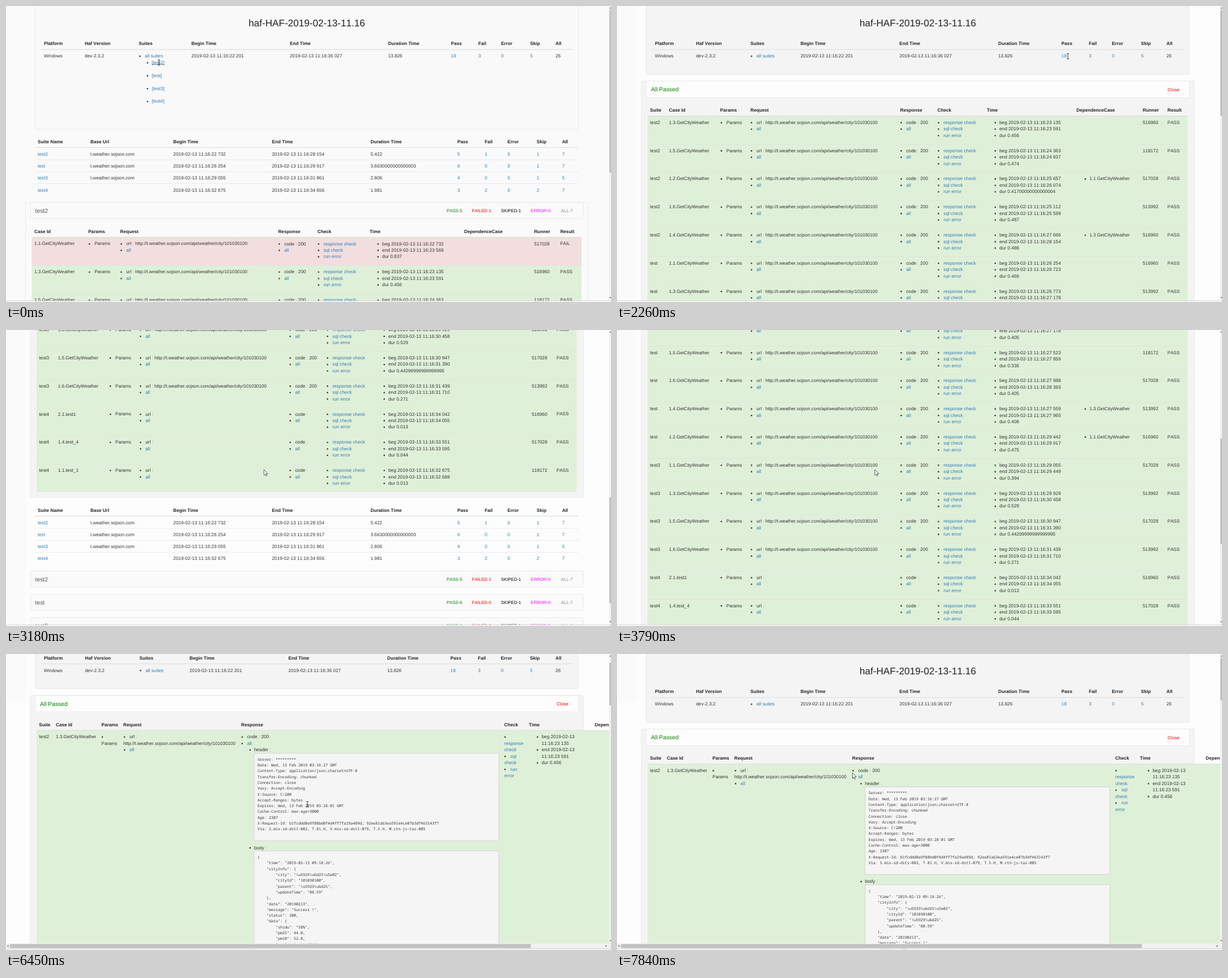
Write an HTML page that moves like this. It is 1068x524 px and loops after 7.99 s.

```html
<!DOCTYPE html>
<html lang="en">
<head>
<meta charset="utf-8">
<title>Test report</title>
<style>
html, body { margin: 0; width: 100%; height: 100%; overflow: hidden; background: #fdfdfd; }
svg { display: block; width: 1068px; height: 524px; }
text { font-family: "Liberation Sans", Arial, sans-serif; font-kerning: none; white-space: pre; text-rendering: geometricPrecision; }
.mono { font-family: "Noto Sans Mono", "DejaVu Sans Mono", monospace; }
</style>
</head>
<body>
<svg id="stage" viewBox="0 0 1068 524" xmlns="http://www.w3.org/2000/svg"></svg>
<script>
const LOOP = 7990, DAY = '2019-02-13 ';
const INK = '#333', LINK = '#337ab7', GREEN = '#dff0d8', PINK = '#f2dede', BORDER = '#e6e6e6';
const HEADING = 10.3, LINE = 11.45, ROW = 49.78;

// --- drawing helpers; y is the middle of the capitals ---
const bodySize = s => /[A-Z]|\/\//.test(s) ? 8.1 : 8.24;
const text = (x, y, s, fill = INK, size = bodySize(s), extra = '') =>
  `<text x="${x}" y="${(y + size * .355).toFixed(2)}" font-size="${size}" fill="${fill}" ${extra}>` +
  String(s).replace(' :', '<tspan fill="#888"> :</tspan>') + '</text>';
const bold = (x, y, s) => text(x, y, s, '#222', 8.18, 'font-weight="700"');
const link = (x, y, s) => text(x, y, s, LINK);
const dot = (x, y) => `<circle cx="${x}" cy="${y + .6}" r="1.3" fill="${INK}"/>`;
const item = (x, y, s, fill, gap = 8.8) => dot(x - gap, y) + text(x, y, s, fill);
const rect = (x, y, x2, y2, fill, stroke) =>
  `<rect x="${x}" y="${y}" width="${x2 - x}" height="${y2 - y}" fill="${fill}"` +
  (stroke ? ` stroke="${stroke}" stroke-width=".8" rx="2"/>` : '/>');
const rule = (x, x2, y, w = .6) => rect(x, y - w / 2, x2, y + w / 2, '#ddd');
const heads = (names, xs, y) => names.split(', ').map((n, i) => bold(xs[i], y, n)).join('');
const stretch = (xs, from, to, k) => xs.map(x => to + (x - from) * k);
const stamp = seconds => DAY + '11:16:' + seconds.toFixed(3).replace('.', ' ');

// --- summary box at the top ---
const TOP = [67, 139.5, 235.5, 324, 498.6, 673, 784.6, 833, 873.4, 925, 970];
const SUITE_NAMES = ['test2', 'test', 'test3', 'test4'];
function summary(wide, open, fill = '#f4f4f4') {
  // the open suite list widens its column and squeezes those after it
  const base = open ? TOP.map((x, i) => i < 3 ? x - i * .6 : x + 3.3 * (970 - x) / 646) : TOP;
  const xs = wide ? stretch(base, 62, 62, 1.0096) : base;
  let out = rect(51.5, -6, wide ? 1020 : 1010.5, open ? 218 : 121, fill, BORDER) +
    text(wide ? 535.7 : 531, 29.5, 'haf-HAF-2019-02-13-11.16', '#222', 17.12, 'text-anchor="middle"') +
    heads('Platform, Haf Version, Suites, Begin Time, End Time, Duration Time, Pass, Fail, Error, Skip, All', xs, 66.5) +
    rule(62, wide ? 1008 : 999, 77, 1.1) + item(xs[2] + 10.7, 88.3, 'all suites', LINK);
  const cells = ['Windows', 'dev-2.3.2', '', stamp(22.201), stamp(36.027), '13.826', 18, 3, 0, 5, 26];
  cells.forEach((s, i) => out += text(xs[i], 88.3, s, i > 5 && i < 10 ? LINK : INK));
  if (open) SUITE_NAMES.forEach((n, i) => out += item(xs[2] + 23, 100 + i * 22.8, `[${n}]`, LINK, 7.5));
  return out;
}

// --- suites: begin, duration, then passed, failed, errors, skipped ---
const SUITES = ['22.732 5.422 5 1 0 1', '26.254 3.6630000000000003 6 0 0 1',
  '29.055 2.806 4 0 0 1', '32.675 1.981 3 2 0 2'].map((line, i) => {
  const [beg, dur, ...counts] = line.split(' ');
  return { name: SUITE_NAMES[i], beg: +beg, dur, counts: [...counts, counts.reduce((a, b) => a + +b, 0)] };
});
const SUITE_COLS = [56, 149, 295.3, 469.5, 643.5, 796.8, 845, 885.2, 936.7, 981.7];
function suiteTable(wide, dy) {
  const xs = wide ? stretch(SUITE_COLS, 51.5, 51.5, 1.01) : SUITE_COLS, right = wide ? 1020 : 1010.5;
  let out = rule(51.5, right, 153.5 + dy, 1.1) +
    heads('Suite Name, Base Url, Begin Time, End Time, Duration Time, Pass, Fail, Error, Skip, All', xs, 143.3 + dy);
  SUITES.forEach(({ name, beg, dur, counts }, i) => {
    const y = 165 + dy + i * 21.2;
    const cells = [name, i < 3 ? 't.weather.sojson.com' : '', stamp(beg), stamp(beg + +dur), dur, ...counts];
    cells.forEach((s, k) => out += text(xs[k], y, s, k && k < 5 ? INK : LINK));
    if (i < 3) out += rule(51.5, right, y + 10.2);
  });
  return out;
}

// --- collapsed suite panels ---
function panelHead(i, wide, y) {
  const { name, counts: [pass, fail, error, skip, all] } = SUITES[i], dx = wide ? 0 : -9.2;
  const tag = (x, label, color) => text(x + dx, y + 14.4, label, color, 7.78);
  return rect(43, y, wide ? 1028 : 1019.3, y + 28.6, wide ? '#fcfcfc' : '#fafafa', BORDER) +
    text(51.6, y + 14.4, name, '#555', HEADING) +
    tag(787, 'PASS-' + pass, 'green') + tag(831.7, 'FAILED-' + fail, 'red') +
    tag(883, 'SKIPED-' + skip, '#000') + tag(935.5, 'ERROR-' + error, '#f0f') + tag(989, 'ALL-' + all, '#888');
}
const panels = (wide, dy) => SUITES.map((_, i) => panelHead(i, wide, 250.6 + dy + i * 41.2)).join('');

// --- test cases: id, begin, duration, runner ---
const RUNNERS = { a: 516960, b: 517028, c: 513992, d: 118172 };
const PASSED = [
  '1.3 23.135 0.456 a, 1.5 24.363 0.474 d, 1.2 25.657 0.41700000000000004 b, 1.6 25.112 0.487 c, 1.4 27.666 0.488 a',
  '1.1 26.254 0.469 a, 1.3 26.773 0.405 c, 1.5 27.523 0.336 d, 1.6 27.988 0.405 b, 1.4 27.559 0.406 c, 1.2 29.442 0.475 a',
  '1.1 29.055 0.394 b, 1.3 29.929 0.529 c, 1.5 30.947 0.44299999999999995 b, 1.6 31.439 0.271 c',
  '2.1.test1 34.042 0.013 a, 1.4.test_4 33.551 0.044 b, 1.1.test_1 32.675 0.013 d',
].flatMap((list, i) => list.split(', ').map(c => SUITE_NAMES[i] + ' ' + c));
const FAILED = 'test2 1.1 22.732 0.837 b';
const DEPENDS = { 1.2: '1.1', 1.4: '1.3' };
const URL_TEXT = 'http://t.weather.sojson.com/api/weather/city/101030100';
const CASE_HEADS = 'Case Id, Params, Request, Response, Check, Time, DependenceCase, Runner, Result';
const CASE_COLS = [91.8, 182, 235.5, 499.8, 565.5, 653, 811, 928, 971.8];
const caseName = id => id.length > 3 ? id : id + '.GetCityWeather';
function caseRow(line, xs, y, x1, x2, fill, showSuite) {
  const [suite, id, beg, dur, runner] = line.split(' '), weather = id.length === 3;
  const [name, params, req, resp, check, time, depend, run, result] = xs;
  const lines = (x, list, fill, gap) => list.map((s, i) => item(x, y + 11.2 + i * LINE, s, fill, gap)).join('');
  const cell = (x, s) => text(x, y + 11.2, s);
  const all = x => item(x + 10.7, y + 11.2 + LINE, 'all', LINK);
  return rect(x1, y, x2, y + ROW + .2, fill) + rule(x1, x2, y) +
    (showSuite ? cell(58.3, suite) : '') + cell(name, caseName(id)) + lines(params + 11, ['Params']) +
    lines(req + 10.7, ['url : ' + (weather ? URL_TEXT : '')]) + all(req) +
    lines(resp + 10.7, ['code : ' + (weather ? 200 : '')]) + all(resp) +
    lines(check + 10.8, ['response check', 'sql check', 'run error'], LINK) +
    lines(time + 22, ['beg ' + stamp(+beg), 'end ' + stamp(+beg + +dur), 'dur ' + dur], INK, 7.3) +
    (DEPENDS[id] ? lines(depend + 23, [caseName(DEPENDS[id])], INK, 7.3) : '') +
    cell(run, RUNNERS[runner]) + cell(result, fill === PINK ? 'FAIL' : 'PASS');
}

// --- scenes ---
function suiteOpen() {
  const xs = stretch(CASE_COLS, 91.8, 50, 1.055);
  return summary(false, true, '#f9f9f9') + suiteTable(false, 97) +
    rect(34.5, 347.8, 1028, 900, '#fafafa', BORDER) + panelHead(0, false, 347.8) + heads(CASE_HEADS, xs, 399) +
    [FAILED, ...PASSED.slice(0, 2)].map((r, i) =>
      caseRow(r, xs, 409.4 + i * ROW, 45.5, 1016, i ? GREEN : PINK)).join('') + rule(45.5, 1016, 409.4, 1.1);
}

const allSuites = open => summary(true, open) + suiteTable(true, open ? 97 : 0) + panels(true, open ? 97 : 0);

const passedFrame = bottom => summary(false, false) +
  rect(43, 133, 1019.3, bottom, '#f4f4f4', BORDER) + rect(51.5, 133, 1010.5, 162, '#fdfdfd', BORDER) +
  text(60, 147.6, 'All Passed', 'green', HEADING) + text(972, 147.8, 'Close', 'red') + bold(58.3, 184.4, 'Suite');

const passedList = () => passedFrame(1101) + heads(CASE_HEADS, CASE_COLS, 184.4) +
  PASSED.map((r, i) => caseRow(r, CASE_COLS, 194.8 + i * ROW, 54, 1007.3, GREEN, true)).join('') +
  rule(54, 1007.3, 194.8, 1.1) + suiteTable(false, 980) + panels(false, 980);

const HEADER = `Server: *********
Date: Wed, 13 Feb 2019 03:16:27 GMT
Content-Type: application/json;charset=UTF-8
Transfer-Encoding: chunked
Connection: close
Vary: Accept-Encoding
X-Source: C/200
Accept-Ranges: bytes
Expires: Wed, 13 Feb 2019 03:28:01 GMT
Cache-Control: max-age=3000
Age: 2307
X-Request-Id: b1fcddd8e9f88bd0f4d4ff7fa29a489d; 92ee81ab3ea591e4ce07b3df463143f7
Via: S.mix-sd-dst1-082, T.81.H, V.mix-sd-dst1-079, T.5.H, M.ctn-js-taz-005`;
const forecast = day => ({ date: String(day), sunrise: '07:0' + (21 - day), high: '\u9ad8\u6e29 3.0\u2103',
  low: '\u4f4e\u6e29 -5.0\u2103', sunset: '17:' + (28 + day), aqi: 60 + day, ymd: '2019-02-' + day });
const PAYLOAD = { time: DAY + '09:18:26',
  cityInfo: { city: '\u5929\u6d25\u5e02', cityId: '101030100', parent: '\u5929\u6d25', updateTime: '08:59' },
  date: '20190213', message: 'Success !', status: 200,
  data: { shidu: '58%', pm25: '44.0', pm10: '52.0', quality: '\u826f', wendu: '-4',
    yesterday: forecast(12), forecast: [13, 14, 15].map(forecast) } };
const json = JSON.stringify(PAYLOAD, null, 4)
  .replace(/[^\x00-\x7f]/g, c => '\\u' + c.charCodeAt(0).toString(16))
  .replace(/("pm\d+": )"([\d.]+)"/g, '$1$2');
const mono = (s, y) => s.split('\n').map((l, i) =>
  text(444, y + i * 10.3, l, INK, 6.687, 'class="mono"')).join('');

function responseDetail() {
  const y = i => 206 + i * LINE;
  const check = ['response', 'check', 'sql', 'check', 'run', 'error'];
  return passedFrame(3300) +
    heads('Case Id, Params, Request, Response, Check, Time, DependenceCase',
      [88, 168.5, 207, 415, 879.5, 923, 1039.3], 184.4) +
    rect(54, 194.8, 1068, 3200, GREEN) + rule(54, 1068, 194.8, 1.1) +
    text(58.3, y(0), 'test2') + text(88, y(0), caseName('1.3')) +
    dot(170, y(0)) + text(168.5, y(1), 'Params') +
    item(218, y(0), 'url :') + text(207, y(1), URL_TEXT) + item(218, y(2), 'all', LINK) +
    item(425.7, y(0), 'code : 200') + item(425.7, y(1), 'all', LINK) +
    item(437.7, y(2), 'header :', INK, 6.8) + rect(438, 235.3, 870, 390.3, '#f5f5f5', '#ccc') + mono(HEADER, 246) +
    item(437.7, 402.3, 'body :', INK, 6.8) + rect(438, 408.2, 870, 3100, '#f5f5f5', '#ccc') + mono(json, 419.4) +
    dot(881, y(0)) + check.map((s, i) => s.length > 3 ? link(879.7, y(i + 1), s) : item(890.5, y(i + 1), s, LINK, 9.5)).join('') +
    ['beg ', 'end '].map((s, i) => item(945.5, y(i * 2), s + DAY, INK, 7.3) +
      text(945.5, y(i * 2 + 1), stamp(23.135 + i * .456).slice(DAY.length))).join('') +
    item(945.5, y(4), 'dur 0.456', INK, 7.3);
}

// total is the page height, zero when nothing scrolls
const SCENES = [
  { from: 0, total: 908, back: '#fafafa', art: suiteOpen() },
  { from: 280, total: 0, art: allSuites(true) },
  { from: 1210, total: 0, art: allSuites(false) },
  { from: 2260, total: 1394, art: passedList() },
  { from: 5740, total: 3345, strip: 83, sideways: true, art: responseDetail() },
];

// --- motion: the screen refreshes in bursts [first, last, count] ---
const BURSTS = [[0, 280, 2], [740, 900, 2], [1210, 1330, 2], [1460, 1860, 4], [2260, 3180, 7], [3330, 3630, 2],
  [3790, 3790, 1], [4090, 4590, 5], [4710, 5130, 4], [5280, 5430, 2], [5740, 6450, 6], [6570, 6690, 2], [6850, 7840, 7]];
const TICKS = BURSTS.flatMap(([a, b, n]) =>
  Array.from({ length: n }, (_, i) => Math.round(a + (b - a) * i / Math.max(n - 1, 1))));

// moves are [start, end, ...goal]
const SCROLLS = [[2413, 3330, 872], [3484, 4465, 0], [6308, 6850, 171], [6850, 7510, 0]];
const POINTS = [[280, 900, 278.7, 90.5], [1210, 1860, 796, 89], [2260, 2567, 455.3, 247.3], [4465, 4590, 472, 237],
  [4590, 5430, 518, 218.5], [5740, 6308, 532, 266], [7345, 7840, 415.5, 210.3]];
const easeOut = u => 1 - (1 - u) ** 1.41;
const glide = (moves, origin, t) => moves.reduce((pos, [start, end, ...goal]) => {
  const u = easeOut(Math.min(1, Math.max(0, (t - start) / (end - start))));
  return pos.map((p, i) => p + (goal[i] - p) * u);
}, origin);

const SHAPES = [[0, 'beam'], [1460, 'arrow'], [1860, 'beam'], [2413, 'arrow'], [5130, 'beam'], [7510, 'arrow']];
// hovered links: [from, to, left, right, y]
const HOVERS = [[0, 280, 257, 279.5, 103.7], [900, 1210, 246.7, 279, 92], [1210, 1460, 248, 280.3, 92],
  [1860, 2260, 792, 801, 92], [5130, 5740, 510.5, 518.5, 221.2]];

const POINTERS = {
  arrow: '<path d="M0 0V9.8L2.3 7.7L3.8 11.2L5.4 10.5L3.9 7.1H6.9Z" fill="#fff" stroke="#222" stroke-width=".7"/>',
  beam: '<path d="M-2-5Q0-5 0-4Q0-5 2-5M0-4V4M-2 5Q0 5 0 4Q0 5 2 5" fill="none" stroke="#222" stroke-width=".9"/>',
};
const triangle = d => `<path d="${d}" fill="#555"/>`;

function scrollbars({ total, sideways }, scroll) {
  const view = sideways ? 512.5 : 521.5, track = sideways ? 490 : 501;
  let out = '';
  if (total) {
    const top = 7 + scroll * track / total;
    out += rect(1064.5, 0, 1068, view, '#f1f1f1') + rect(1065, top, 1068, top + view * track / total, '#c1c1c1') +
      triangle('M1065.2 4.5l1.5-2l1.5 2Z') + triangle(`M1065.2 ${view - 6}l1.5 2l1.5-2Z`);
  }
  if (sideways) out += rect(0, 512.5, 1068, 521.5, '#f1f1f1') + rect(7, 513.5, 926.5, 520.5, '#c1c1c1') +
    triangle('M4.3 515.3v3.4l-2.3-1.7Z') + triangle('M1058.5 515.3v3.4l2.3-1.7Z');
  return out + rect(0, 521.4, 1068, 522.6, '#d4d4d4') + rect(0, 522.6, 1068, 524, '#fafafa');
}

const stage = document.getElementById('stage');
const last = (list, test) => list.filter(test).pop();
let shown = -1;
function render(time) {
  const t = last(TICKS, k => k <= time % LOOP);
  if (t === shown) return;
  shown = t;
  const scene = last(SCENES, s => s.from <= t);
  const [scroll] = glide(SCROLLS, [0], t), [x, y] = glide(POINTS, [270, 100], t);
  const hover = HOVERS.find(([from, to]) => t >= from && t < to);
  stage.innerHTML = rect(0, 0, 1068, 524, scene.back || '#fdfdfd') +
    rect(0, 0, 34, scene.strip || 522, '#fafafa') +
    `<g transform="translate(0 ${-scroll})">${scene.art}</g>` +
    (hover ? rect(hover[2], hover[4] - .3, hover[3], hover[4] + .3, '#23527c') : '') +
    scrollbars(scene, scroll) +
    `<g transform="translate(${x} ${y})">${POINTERS[last(SHAPES, s => s[0] <= t)[1]]}</g>`;
}

const start = performance.now();
function loop() {
  render(performance.now() - start);
  requestAnimationFrame(loop);
}
loop();
</script>
</body>
</html>
```
